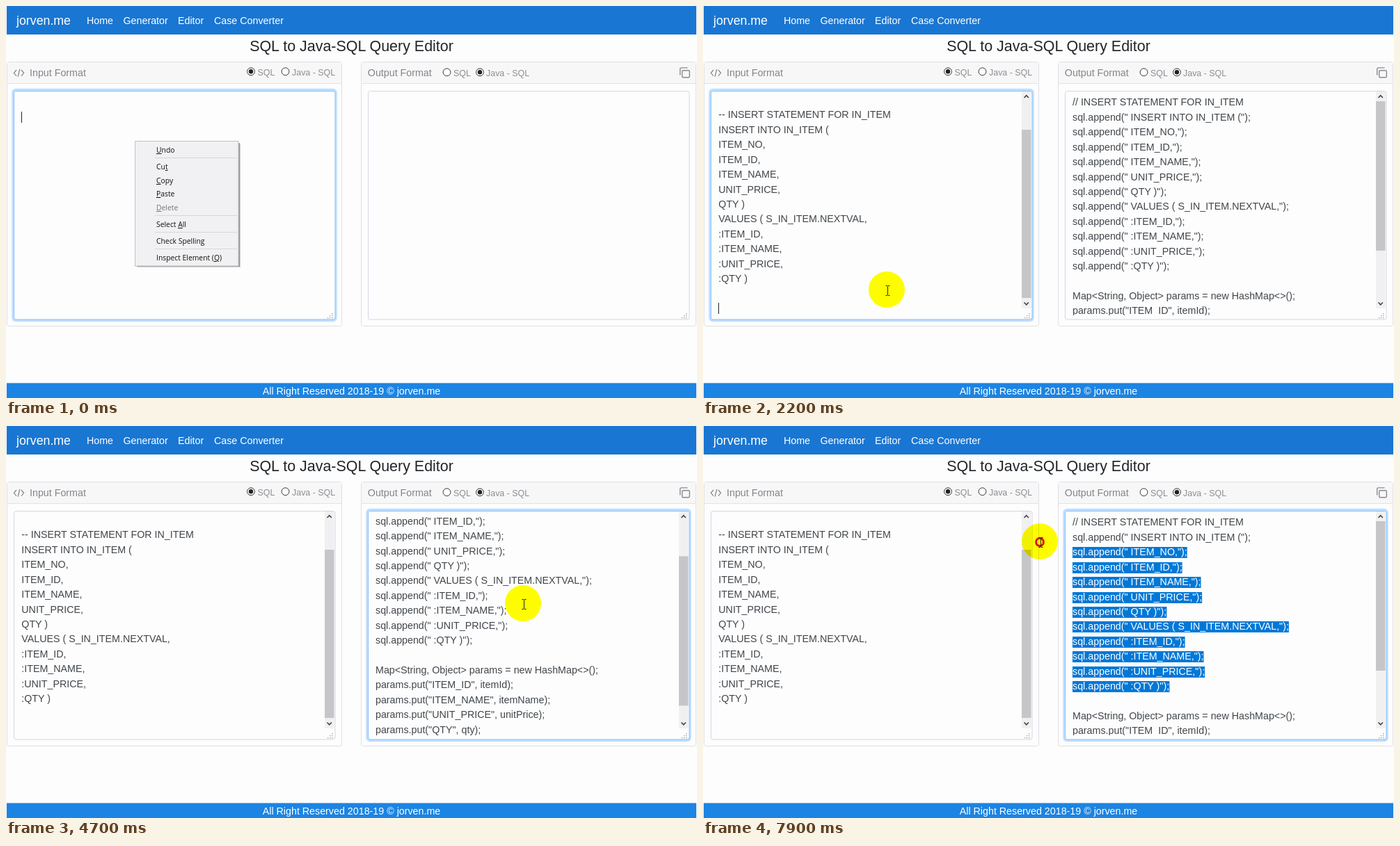
These frames come from a looping animation (993x564 px, 8 s). An HTML page:

```html
<!DOCTYPE html>
<html lang="en">
<head>
<meta charset="utf-8">
<title>SQL to Java-SQL Query Editor</title>
<style>
html, body { margin: 0; width: 100%; height: 100%; overflow: hidden; background: #fdfdfd; }
svg { display: block; width: 993px; height: 564px; }
text { font: 14.28px "Liberation Sans", Arial, sans-serif; white-space: pre; }
.nav, .foot { fill: #fff; }
.brand { font-size: 17.78px; fill: #fff; }
.title { font-size: 21.45px; fill: #212529; }
.head { fill: #838589; }
.label { font-size: 12.44px; fill: #8c8e92; }
.code { fill: #41464b; }
.picked { fill: #fff; }
.menu { font: 10.35px "Open Sans", "Noto Sans", sans-serif; fill: #111; }
.tip { font: 12.44px "Open Sans", "Noto Sans", sans-serif; fill: #fff; }
.u { text-decoration: underline; }
#spot { mix-blend-mode: multiply; }
</style>
</head>
<body>
<svg id="stage" viewBox="0 0 993 564" xmlns="http://www.w3.org/2000/svg"></svg>
<script>
const LOOP = 8000, STEP = 100, PITCH = 21.43;
const LEFT_X = 22.3, LEFT_Y = 161.4, RIGHT_X = 531, RIGHT_Y = 143.4;
const stage = document.getElementById('stage');
const $ = id => document.getElementById(id);
const esc = s => s.replace(/&/g, '&amp;').replace(/</g, '&lt;').replace(/>/g, '&gt;');

const input = `-- INSERT STATEMENT FOR IN_ITEM
INSERT INTO IN_ITEM (
ITEM_NO,
ITEM_ID,
ITEM_NAME,
UNIT_PRICE,
QTY )
VALUES ( S_IN_ITEM.NEXTVAL,
:ITEM_ID,
:ITEM_NAME,
:UNIT_PRICE,
:QTY )`.split('\n');
const output = [
  '// INSERT STATEMENT FOR IN_ITEM',
  ...input.slice(1).map(s => `sql.append(" ${s}");`),
  '',
  'Map<String, Object> params = new HashMap<>();',
  ...[['ITEM_ID', 'itemId'], ['ITEM_NAME', 'itemName'], ['UNIT_PRICE', 'unitPrice'], ['QTY', 'qty']]
    .map(([k, v]) => `params.put("${k}", ${v});`)
];

// Static parts
const text = (x, y, cls, s, more = '') => `<text x="${x}" y="${y}" class="${cls}" ${more}>${esc(s)}</text>`;
const rect = (x, y, w, h, fill, more = '') => `<rect x="${x}" y="${y}" width="${w}" height="${h}" fill="${fill}" ${more}/>`;
const rowY = (y, i) => Math.round(y + i * PITCH);
const lines = (rows, x, y, cls) => rows.map((s, i) => text(x, rowY(y, i), cls, s)).join('');

const radio = (x, y, on) =>
  `<circle cx="${x}" cy="${y}" r="5.4" fill="#fff" stroke="#333"/>` +
  (on ? `<circle cx="${x}" cy="${y}" r="3.2" fill="#222"/>` : '');

const card = x =>
  rect(x + .5, 80.5, 481, 380, '#fdfdfd', 'rx="3" stroke="#e0e0e6"') +
  rect(x + 1, 81, 480, 31, '#f7f7f8') +
  rect(x + 1, 111, 480, 1, '#e3e3e8');

function area(id, x) {
  let dots = '';
  for (let r = 0; r < 3; r++)
    for (let c = 0; c <= r; c++)
      dots += rect(x + 457 - c * 3, 442 + r * 3, 1.3, 1.3, '#999');
  return rect(x - 1, 120.5, 464, 332, 'none', `id="${id}Glow" rx="4" stroke="#bfdeff" stroke-width="3.4"`) +
    rect(x + .5, 122.5, 461.5, 328.5, '#fdfdfd', `id="${id}Box" rx="3"`) + dots;
}

const bar = (id, x, y, h) => `<g id="${id}">` +
  rect(x, 123, 13.5, 312, '#f0f0f1') +
  rect(x, y, 13.5, h, '#c6c6c9', `id="${id}Thumb"`) +
  `<path d="M${x + 3.5} 132l3.2-3.3 3.2 3.3M${x + 3.5} 426.5l3.2 3.3 3.2-3.3" fill="none" stroke="#444" stroke-width="1.6"/></g>`;

// label before, underlined letter, label after, baseline
const menuItems = [
  ['', 'U', 'ndo', 211], ['Cu', 't', '', 235], ['', 'C', 'opy', 255], ['', 'P', 'aste', 274],
  ['', 'D', 'elete', 294], ['Select ', 'A', 'll', 318], ['Check Spellin', 'g', '', 342],
  ['Inspect Element (', 'Q', ')', 366]
];
const menu = '<g id="menu">' +
  rect(189, 198, 148, 178, '#777', 'opacity=".35"') +
  rect(188, 197, 148, 178, '#777', 'opacity=".6"') +
  rect(185.5, 194.5, 148.5, 179.5, '#f1f1f3', 'stroke="#c2c2c4"') +
  [218, 301, 325, 349].map(y => rect(214, y, 118, 1, '#d6d6d8')).join('') +
  rect(187, 260, 144.5, 19.5, '#91c9f7', 'id="hover"') +
  menuItems.map(([a, k, b, y]) =>
    `<text x="216" y="${y}" class="menu"${k === 'D' ? ' style="fill:#777"' : ''}>${a}<tspan class="u">${k}</tspan>${b}</text>`).join('') +
  '</g>';

const pointer = '<g id="spot"><circle r="26" fill="#ff0"/></g>' +
  '<g id="cursor">' +
  '<circle id="ring" r="5.4" fill="none" stroke="#e3120b" stroke-width="3"/>' +
  '<path id="arrow" d="M1 0v15l3.6-3.3 2.6 5.6 2.4-1.1-2.5-5.4H12z" fill="#fff" stroke="#111" stroke-width="1"/>' +
  '<path id="beam" d="M-1.5-6.5h2.2l.8.7.8-.7h2.2M1.5-5.8V7M-1.5 7.5h2.2l.8-.7.8.7h2.2" fill="none" stroke="#222"/>' +
  '<path id="hand" d="M-.8 0q1.5-1.6 3 0v6l2.4.3.4.8 2 .2.4.8q2 .2 2 2v4l-1.6 3.5v2H.2v-2l-4.6-6q-.4-2 1.6-1.8l2 2z" fill="#fff" stroke="#111"/>' +
  '</g>';

stage.innerHTML =
  '<defs><clipPath id="clip">' + rect(521, 123, 446, 322, '#000') + '</clipPath><clipPath id="pickClip"></clipPath></defs>' +
  rect(0, 0, 993, 564, '#fdfdfd') +
  rect(1, 0, 991, 41, '#1976d2') +
  text(15, 27, 'brand', 'jorven.me') +
  [[116, 'Home'], [168.5, 'Generator'], [247, 'Editor'], [299, 'Case Converter']].map(([x, s]) => text(x, 26, 'nav', s)).join('') +
  text(496.5, 65, 'title', 'SQL to Java-SQL Query Editor', 'text-anchor="middle"') +
  card(1) + card(510) +
  '<path d="M15 92l-3.6 4.3 3.6 4.3M22 92l3.6 4.3-3.6 4.3M19.8 91l-2.6 10.6" fill="none" stroke="#888a8e" stroke-width="1.3"/>' +
  text(34, 101, 'head', 'Input Format') + text(519.8, 101, 'head', 'Output Format') +
  radio(352, 94.3, true) + text(361.5, 100, 'label', 'SQL') +
  radio(401.5, 94.3, false) + text(411, 100, 'label', 'Java - SQL') +
  radio(633.5, 95.3, false) + text(643, 101, 'label', 'SQL') +
  radio(681, 95.3, true) + text(690, 101, 'label', 'Java - SQL') +
  '<g id="copy" fill="none" stroke="#888a8e" stroke-width="1.4"><rect x="971.7" y="92.7" width="10.6" height="10" rx="1.5"/>' +
  '<path d="M968.7 99.5v-8.8q0-1.8 1.8-1.8h9"/></g>' +
  area('left', 11) + area('right', 520) +
  '<g id="pasted">' + lines(input, LEFT_X, LEFT_Y, 'code') + bar('leftBar', 458, 178, 242) + '</g>' +
  '<g id="result"><g clip-path="url(#clip)"><g id="scroll">' + lines(output, RIGHT_X, RIGHT_Y, 'code') +
  '<g id="pickBg"></g><g clip-path="url(#pickClip)">' + lines(output, RIGHT_X, RIGHT_Y, 'picked') + '</g>' +
  rect(718, 238.5, 1, 15.5, '#222', 'id="rightCaret"') + '</g></g>' + bar('rightBar', 967, 137, 215) + '</g>' +
  rect(22, 152, 1, 16, '#222', 'id="leftCaret"') +
  rect(1, 542.5, 991, 21.5, '#1c84e2') +
  text(496.5, 558.5, 'foot', 'All Right Reserved 2018-19 © jorven.me', 'text-anchor="middle"') +
  menu + pointer +
  '<g id="tip"><path d="M962 85l5-13h17l5 13-13.500-4z" fill="#1010e8"/>' +
  rect(954, 54, 46, 25.5, '#171717', 'rx="3"') + text(960.5, 72, 'tip', 'Copy') + '</g>';

// Timed parts
const path = [
  [100, 188, 198], [700, 242, 269.5], [1000, 242, 269.5], [1600, 262, 400], [2000, 262, 400],
  [2200, 264, 408], [2500, 264, 408], [3300, 743, 255], [5000, 743, 255], [5600, 975, 95],
  [6200, 975, 95], [6500, 722, 290], [6700, 715, 328], [7000, 674, 382], [7100, 672, 378],
  [7600, 495, 154], [7800, 484, 166], [8000, 484, 166]
];
const scrolls = [[0, 0], [4300, 0], [4900, 89.3], [6300, 89.3], [6700, 0], [8000, 0]];
const presses = [[800, 1000], [3300, 3400], [7100, 8000]];
const leftBlink = [[0, 300], [1000, 1500], [2000, 2500], [3000, 3300]];
const rightBlink = [[3300, 3600], [4100, 4600], [5100, 5600], [6300, 6800]];

const within = (t, spans) => spans.some(([a, b]) => t >= a && t < b);
const show = (id, on) => $(id).setAttribute('display', on ? 'inline' : 'none');
const move = (id, x, y) => $(id).setAttribute('transform', `translate(${x} ${y})`);

function sample(keys, t) {
  if (t <= keys[0][0]) return keys[0].slice(1);
  const i = keys.findIndex(k => k[0] > t);
  const [a, b] = [keys[i - 1], keys[i]];
  const p = (t - a[0]) / (b[0] - a[0]), e = p * p * (3 - 2 * p);
  return a.slice(1).map((v, j) => v + (b[j + 1] - v) * e);
}

const pen = document.createElement('canvas').getContext('2d');
pen.font = '14.28px "Liberation Sans", Arial, sans-serif';
const width = s => pen.measureText(s).width;

// Left edge of the selection, snapped to a letter
function snap(s, x) {
  let n = 0;
  while (n < s.length && RIGHT_X + (width(s.slice(0, n)) + width(s.slice(0, n + 1))) / 2 < x) n++;
  return width(s.slice(0, n));
}

function select(t, x, y) {
  let boxes = '';
  if (t >= 7100) {
    const first = Math.max(0, Math.min(11, Math.round((y - 128) / PITCH)));
    for (let i = first; i < 12; i++) {
      const from = i === first ? snap(output[i], x) : 0;
      boxes += rect(RIGHT_X + from, rowY(RIGHT_Y, i) - 12, Math.max(0, width(output[i]) - from), 16, '#0078d7');
    }
  }
  $('pickBg').innerHTML = $('pickClip').innerHTML = boxes;
}

function focus(id, on) {
  show(id + 'Glow', on);
  $(id + 'Box').setAttribute('stroke', on ? '#86c0fa' : '#d3d6e4');
}

function draw(t) {
  const [x, y] = sample(path, t), [top] = sample(scrolls, t);
  const open = t < 1000, seen = t >= 100;
  const overText = y > 122 && y < 451 && (x > 11 && x < 473 || x > 520 && x < 982);
  const overCopy = x > 966 && y < 106;
  const beam = !open && (overText || t >= 7100);

  show('menu', open);
  const item = menuItems.find(m => y > m[3] - 14 && y <= m[3] + 6);
  show('hover', open && seen && item);
  if (item) $('hover').setAttribute('y', item[3] - 14);

  show('pasted', !open);
  show('result', t >= 2000);
  show('leftCaret', within(t, leftBlink));
  $('leftCaret').setAttribute('y', open ? 152 : 427);
  show('rightCaret', within(t, rightBlink));
  focus('left', t < 3300);
  focus('right', t >= 3300);

  move('scroll', 0, -top);
  $('rightBarThumb').setAttribute('y', 137 + top * 68 / 89.3);
  select(t, x, y);

  show('spot', seen);
  show('cursor', seen);
  move('spot', x, y);
  move('cursor', Math.round(x), Math.round(y) + 1);
  show('ring', within(t, presses));
  show('beam', beam);
  show('hand', overCopy);
  show('arrow', !beam && !overCopy);
  show('tip', overCopy);
  $('copy').setAttribute('stroke', overCopy ? '#444' : '#888a8e');
}

let last = -1;
function tick() {
  const t = Math.floor(performance.now() % LOOP / STEP) * STEP;
  if (t !== last) draw(last = t);
  requestAnimationFrame(tick);
}
tick();
</script>
</body>
</html>
```
